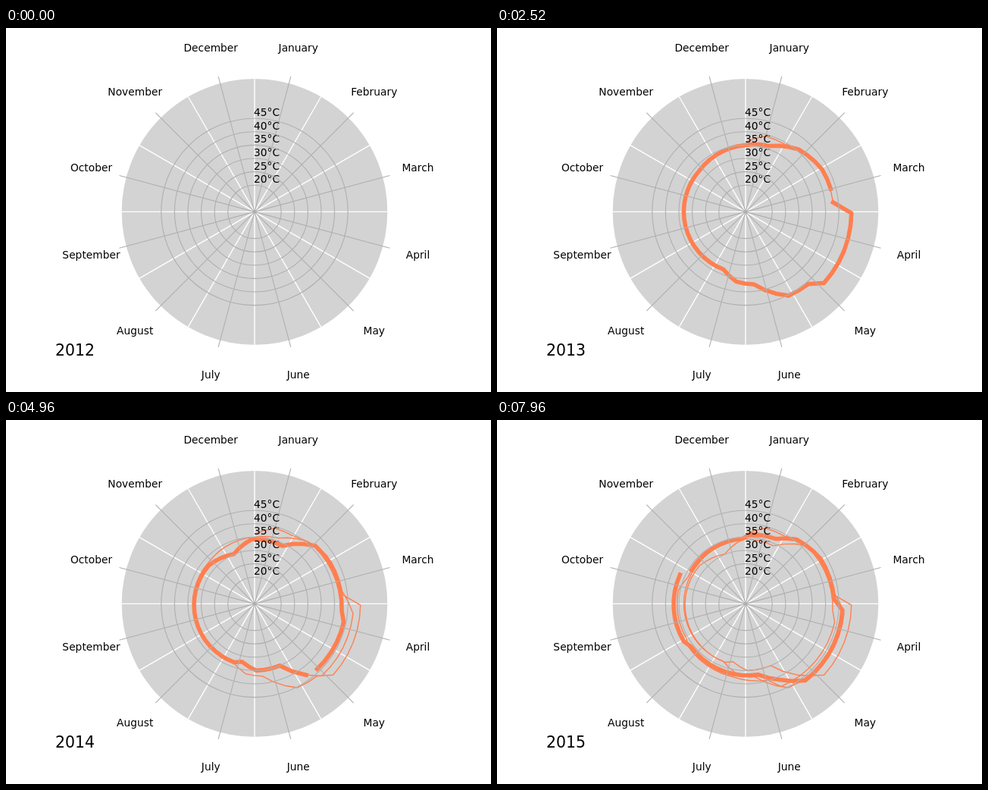
Recreate the animation shown at these times as an HTML page with a canvas. Size 640 by 480 pixels, loop 8000 ms.

```html
<!DOCTYPE html>
<html lang="en">
<head>
<meta charset="utf-8">
<title>Weekly temperature spiral</title>
<style>
  html, body { margin: 0; width: 100%; height: 100%; overflow: hidden; background: #fff; }
  canvas { display: block; }
</style>
</head>
<body>
<canvas id="chart" width="640" height="480"></canvas>
<script>
const ctx = document.getElementById('chart').getContext('2d');

const STEP = 40, WEEKS = 200, TRAIL = 51;
const CX = 328, CY = 242.4;
const DISC = 176, SPOKE = 184.8, LABEL_R = 223.1;
const PT = 100 / 72;
const SMALL = 13.8, LARGE = 20.45;
const MONTHS = ['January', 'February', 'March', 'April', 'May', 'June', 'July',
  'August', 'September', 'October', 'November', 'December'];
const YEAR_START = [0, 366, 731, 1096];

// Turning points as [week, °C], one row per year.
const TURNS = [
  [0, 36.3], [2, 39.3], [4, 39.2], [8, 42.6], [12, 43], [13, 49.7], [19, 49.7], [20, 45.8], [22, 45.3], [25, 37.3], [27, 36.4], [29, 33.1], [45, 33.2],
  [52, 35], [55, 36.2], [58, 40.7], [61, 42.8], [64, 43.2], [66, 47.1], [72, 46.9], [75, 35], [78, 35], [80, 32.2], [81, 33.2], [97, 32.4], [101, 30.2],
  [104, 34.3], [108, 34.1], [111, 41.5], [118, 42.8], [119, 44.1], [127, 43.7], [128, 39.8], [132, 37.7], [138, 36.8], [139, 35.7], [145, 35.7], [147, 33.8],
  [156, 34.4], [157, 36.1], [160, 36.8], [162, 40.8], [165, 42.8], [169, 43.2], [170, 46.4], [177, 46.4], [179, 41.2], [181, 37], [190, 36], [191, 37.1], [199, 36.9]
];

const radius = celsius => (celsius - 10) * 3.52;

function temperature(week) {
  const i = Math.max(1, TURNS.findIndex(([w]) => w >= week));
  const [w0, t0] = TURNS[i - 1], [w1, t1] = TURNS[i];
  return t0 + (t1 - t0) * (week - w0) / (w1 - w0);
}

// Clockwise from the top.
function polar(deg, r) {
  const a = deg * Math.PI / 180;
  return [CX + r * Math.sin(a), CY - r * Math.cos(a)];
}

const yearIndex = week => YEAR_START.filter(d => d <= week * 7).length - 1;

const points = Array.from({ length: WEEKS }, (_, week) => {
  const dayOfYear = week * 7 + 1 - YEAR_START[yearIndex(week)];
  return polar(dayOfYear * 360 / 365, radius(temperature(week)));
});

function stroke(color, pt) {
  ctx.strokeStyle = color;
  ctx.lineWidth = pt * PT;
  ctx.stroke();
}

function spokes(offset, length, color, pt) {
  ctx.beginPath();
  for (let i = 0; i < 12; i++) {
    ctx.moveTo(CX, CY);
    ctx.lineTo(...polar(i * 30 + offset, length));
  }
  stroke(color, pt);
}

function circle(r) {
  ctx.beginPath();
  ctx.arc(CX, CY, r, 0, Math.PI * 2);
}

function curve(from, to, pt) {
  if (to <= from) return;
  ctx.beginPath();
  for (let k = from; k <= to; k++) ctx.lineTo(...points[k]);
  stroke('#ff7f50', pt);
}

function text(str, x, y, size, align) {
  ctx.font = size + 'px "DejaVu Sans", sans-serif';
  ctx.textAlign = align;
  ctx.fillStyle = '#000';
  ctx.fillText(str, x, y);
}

function drawDisc() {
  circle(DISC);
  ctx.fillStyle = '#d3d3d3';
  ctx.fill();
  stroke('#fff', 1);
  spokes(0, DISC, '#fff', 1);
}

function drawAxes() {
  spokes(15, SPOKE, '#b0b0b0', 0.8);
  for (let t = 20; t <= 45; t += 5) {
    const r = radius(t);
    circle(r);
    stroke('#b0b0b0', 0.8);
    text(t + '°C', 327, Math.round(CY - r - 3), SMALL, 'left');
  }
  MONTHS.forEach((name, i) => {
    const [x, y] = polar(15 + i * 30, LABEL_R);
    text(name, x, Math.round(y + 4), SMALL, 'center');
  });
}

function draw(week) {
  ctx.fillStyle = '#fff';
  ctx.fillRect(0, 0, 640, 480);
  ctx.lineCap = 'butt';
  drawDisc();
  ctx.lineCap = 'square';
  ctx.lineJoin = 'round';
  curve(0, week, 1);
  curve(Math.max(0, week - TRAIL), week, 4);
  ctx.lineCap = 'butt';
  drawAxes();
  text(String(2012 + yearIndex(week)), 65, 432, LARGE, 'left');
}

function tick() {
  draw(Math.floor(performance.now() / STEP + 1e-6) % WEEKS);
  requestAnimationFrame(tick);
}
tick();
</script>
</body>
</html>
```
